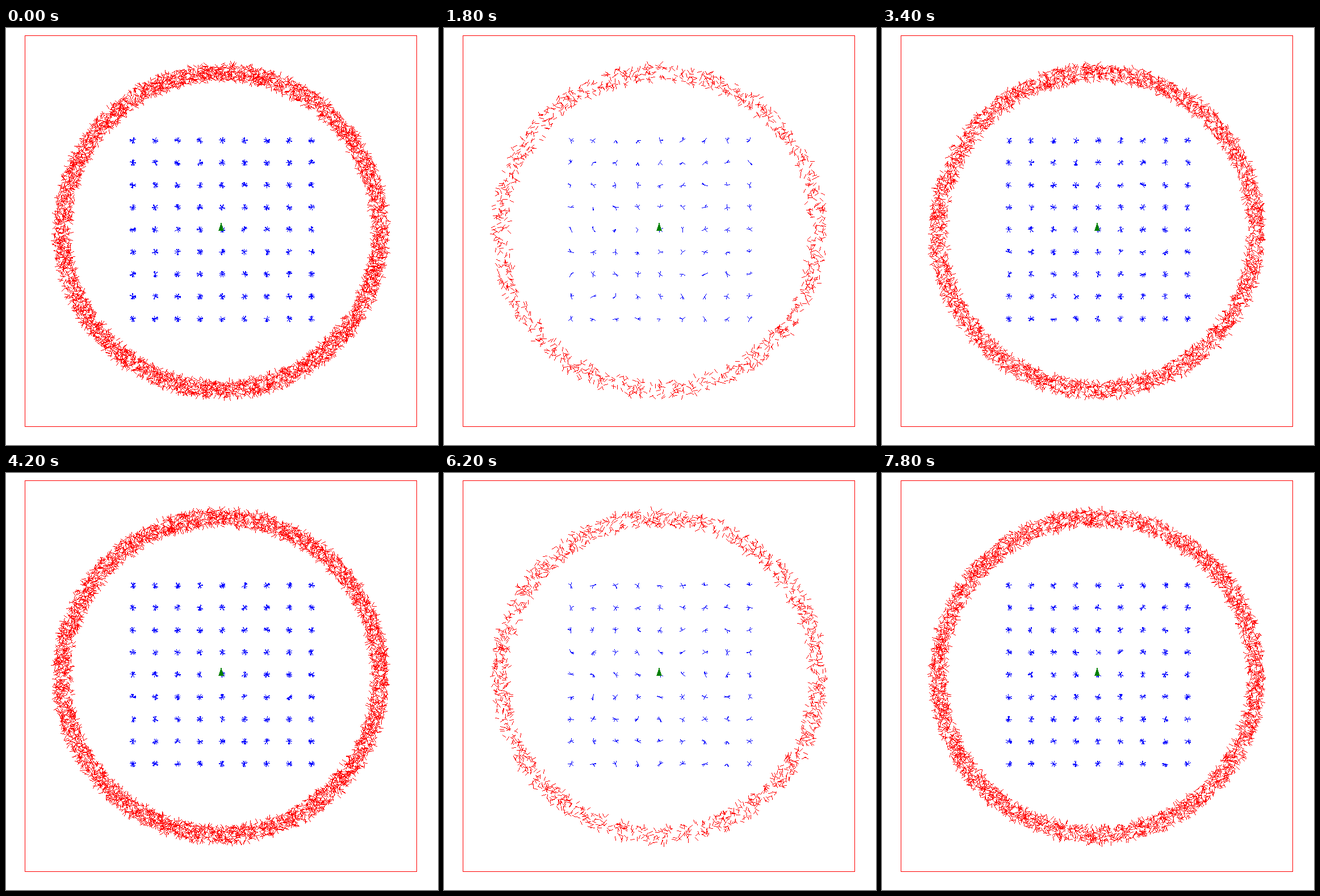
A matplotlib script for the animation above (8000 ms loop, 761x736 px).

```python
import numpy as np
import matplotlib.pyplot as plt
from matplotlib.animation import FuncAnimation

W, H, DPI = 761, 736, 64
FRAMES, STEP_MS = 40, 200
CYCLE, START = 21, 16            # batches before a wipe, batches at the first frame
CX, CY = 378.5, 358
LEFT, TOP, RIGHT, BOTTOM = 33, 13, 723, 703
RED, BLUE, GREEN = (255, 0, 0), (0, 0, 255), (0, 128, 0)

grid = np.stack(np.meshgrid(223 + 39.35 * np.arange(9),
                            198 + 39.35 * np.arange(9)), -1).reshape(-1, 2)


def polar(radius, angle):
    return np.stack([radius * np.cos(angle), radius * np.sin(angle)], -1)


def dashes(start, length, rng):
    """Pixels of one-pixel-wide strokes in random directions."""
    turn = rng.uniform(0, 2 * np.pi, len(start))
    a = np.rint(start)
    span = np.rint(start + polar(length, turn)) - a
    steps = np.abs(span).max(axis=1)[:, None]
    k = np.minimum(np.arange(length + 2), steps) / steps
    points = a[:, None] + span[:, None] * k[..., None]
    return np.rint(points).astype(int).reshape(-1, 2)


def batch(cycle, n):
    rng = np.random.default_rng(1000 * cycle + n + 7)
    radius = rng.uniform(266, 294, 300)
    angle = rng.uniform(0, 2 * np.pi, 300)
    ring = dashes(polar(radius, angle) + (CX, CY), 7, rng)
    return ring, dashes(grid, 5, rng)


def paint(canvas, points, color):
    canvas[points[:, 1], points[:, 0]] = color


def blank():
    canvas = np.full((H, W, 3), 255, np.uint8)
    canvas[[TOP, BOTTOM], LEFT:RIGHT + 1] = RED
    canvas[TOP:BOTTOM + 1, [LEFT, RIGHT]] = RED
    return canvas


rows, cols = np.mgrid[:H, :W]
arrow = ((rows >= 344) & (rows <= 357)
         & (np.abs(cols - CX) <= 0.5 + 4 * (rows - 344) / 13))

cycles = range((START + FRAMES - 1) // CYCLE + 1)
batches = [[batch(c, n) for n in range(CYCLE - 1)] for c in cycles]

fig = plt.figure(figsize=(W / DPI, H / DPI), dpi=DPI, facecolor="white")
ax = fig.add_axes([0, 0, 1, 1])
ax.axis("off")
picture = ax.imshow(blank(), extent=(0, W, H, 0), aspect="auto",
                    interpolation="nearest")


def draw(frame):
    cycle, count = divmod(START + frame, CYCLE)
    canvas = blank()
    for ring, stars in batches[cycle][:count]:
        paint(canvas, ring, RED)
        paint(canvas, stars, BLUE)
    canvas[arrow] = GREEN
    picture.set_data(canvas)
    return picture,


anim = FuncAnimation(fig, draw, frames=FRAMES, interval=STEP_MS,
                     repeat=True, repeat_delay=0)
plt.show()
```
